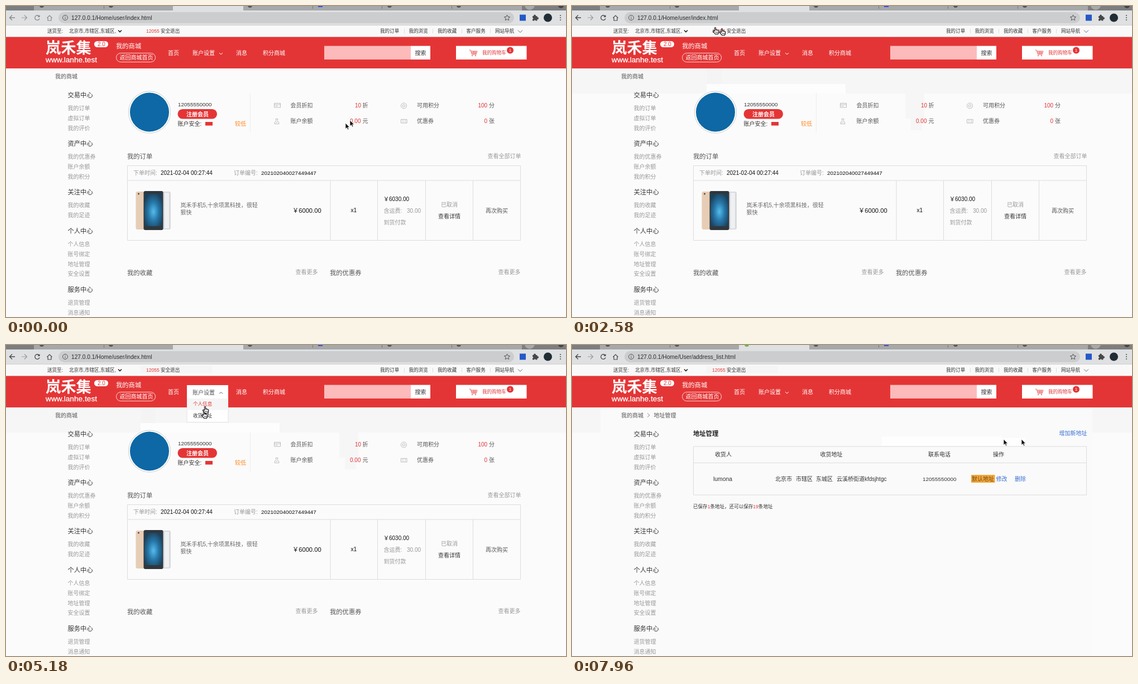
An HTML page that plays this animation: 1003 px wide and 558 px high, repeating every 8000 ms.

```html
<!DOCTYPE html>
<html lang="zh-CN">
<head>
<meta charset="utf-8">
<style>
html, body { margin: 0; width: 100%; height: 100%; overflow: hidden; background: #fbfbfb; }
svg { display: block; width: 1003px; height: 558px; font-family: "Liberation Sans", "Noto Sans CJK SC", "Noto Sans CJK", sans-serif; }
text { white-space: pre; }
</style>
</head>
<body>
<svg id="stage" viewBox="0 0 1003 558"></svg>
<script>
const LOOP = 8000, PAGE_CHANGE = 6850;
const RED = '#e43536', DARK = '#333', GREY = '#999', LINE = '#dcdcdc', BLUE = '#3b6fd4';

// Drawing helpers; text is placed by its left edge and vertical centre.
const text = (x, y, str, size = 10, fill = DARK, extra = '') =>
  `<text x="${x}" y="${y + size * .37}" font-size="${size}" fill="${fill}" ${extra}>${str}</text>`;
const rect = (x, y, w, h, fill, extra = '') =>
  `<rect x="${x}" y="${y}" width="${w}" height="${h}" fill="${fill}" ${extra}/>`;
const circle = (x, y, r, fill, extra = '') => `<circle cx="${x}" cy="${y}" r="${r}" fill="${fill}" ${extra}/>`;
const stroke = (d, color, width = 1, extra = '') =>
  `<path d="${d}" fill="none" stroke="${color}" stroke-width="${width}" ${extra}/>`;
const chevron = (x, y, color, up = 1, width = 1) =>
  stroke(`M${x - 3} ${y - 1.5 * up}l3 ${3 * up}l3 ${-3 * up}`, color, width);
const during = (from, to, content) => `<g data-from="${from}" data-to="${to}">${content}</g>`;
const BOLD = 'font-weight="700"';

function browser() {
  const tabs = rect(0, 0, 1003, 9, '#a7a8a9') + rect(0, 0, 50, 8, '#7d7e7f') + rect(299, 0, 126, 9, '#dfe0e1') +
    rect(924, 0, 79, 8, '#7d7e7f') +
    [64, 188, 437, 687, 811].map(x => circle(x, -1, 4, '#555')).join('') +
    [175, 549, 673, 798].map(x => rect(x, 0, 1, 5, '#777')).join('') +
    rect(559, -4, 8, 6, '#3c50d8') + circle(938, -2, 9, '#a7a8a9') + circle(994, -1, 5, '#444') +
    during(6430, PAGE_CHANGE, stroke('M311 0a4 4 0 0 0 6 1', '#777', 1.3)) +
    during(7170, LOOP, circle(313, -1, 4, '#64b947'));
  const reload = c => stroke('M59.5 18.5a4.3 4.3 0 1 0 .6 4', c, 1.3) + `<path d="M60.5 16v4h-4z" fill="${c}"/>`;
  const nav = c => stroke('M16 21H7m4-4.5L6.5 21l4.5 4.5', c, 1.3) +
    stroke('M73.5 21.5L78 17l4.5 4.5M75 21v5h6v-5', c, 1.2);
  const bar = rect(0, 8, 1003, 26, '#dfe0e1') + rect(0, 34, 1003, 1, '#d0d0d0') +
    rect(94, 11, 816, 20, '#cbcdce', 'rx="10"') +
    stroke('M28 21h9m-4-4.5l4.5 4.5l-4.5 4.5', '#999', 1.2) +
    during(0, 1280, nav('#85878a') + reload('#85878a')) +
    during(1280, LOOP, nav('#454749')) +
    during(1280, 5950, reload('#454749')) + during(PAGE_CHANGE, LOOP, reload('#454749')) +
    during(5950, PAGE_CHANGE, stroke('M52 17l8 8m0-8l-8 8', '#454749', 1.4)) +
    circle(106, 21, 4.5, 'none', 'stroke="#555"') + rect(105.5, 20.5, 1, 3, '#555') + rect(105.5, 18.3, 1, 1, '#555') +
    during(0, 5950, text(117, 21, '127.0.0.1/Home/user/index.html', 10.2, '#2c2c2c')) +
    during(5950, LOOP, text(117, 21, '127.0.0.1/Home/User/address_list.html', 10.2, '#2c2c2c')) +
    stroke('M897.5 16l1.5 3.3l3.6 .4l-2.7 2.4l.8 3.6l-3.2 -1.9l-3.2 1.9l.8 -3.6l-2.7 -2.4l3.6 -.4z', '#555') +
    rect(920, 15.5, 11, 11, '#2459c8') +
    rect(943, 18, 8.5, 8.5, '#454749', 'rx="1"') + circle(947, 17.5, 2, '#454749') + circle(952, 22, 2, '#454749') +
    circle(943, 22.3, 1.3, '#dfe0e1') + circle(947.3, 26.5, 1.3, '#dfe0e1') +
    circle(970.5, 21, 7.5, '#202d35') +
    [17, 21, 25].map(y => circle(993, y, 1.1, '#555')).join('');
  return tabs + bar;
}

function topBar() {
  const links = ['我的订单', '我的浏览', '我的收藏', '客户服务', '网站导航'];
  const place = text(113, 45, '北京市,市辖区,东城区,', 8.55) + chevron(204, 45, '#222', 1, 1.6);
  return rect(0, 35, 1003, 21, '#f9f9f9') +
    during(4250, LOOP, rect(241, 37, 128, 14, '#f6f5f5')) +
    text(74, 45, '送货至:', 8.55) +
    during(0, PAGE_CHANGE, place) + during(7010, LOOP, place) +
    during(PAGE_CHANGE, 7010, chevron(121, 45, '#222', 1, 1.6)) +
    text(251, 45, '12055', 8.55, RED) + text(277, 45, '安全退出', 8.55) +
    links.map((label, i) => text(670 + 51.5 * i, 45, label, 8.55)).join('') +
    [713, 764, 816, 867].map(x => rect(x, 41, 1, 8, LINE)).join('') +
    stroke('M917 43.5l4 4l4 -4', '#666');
}

function header() {
  const cart = stroke('M829.5 79h2.5l2.5 8h7.5l2 -6h-11.5m.5 2h10m-9 2h8.500M837 81v6m3-6v6', RED, .7) +
    circle(835, 89.2, .9, RED) + circle(841, 89.2, .9, RED);
  return rect(0, 55.5, 1003, 56.5, RED) +
    text(71, 75, '岚禾集', 27.3, '#fff', BOLD) +
    rect(158, 63, 25, 11, '#fff', 'rx="5.5"') + text(164, 68.5, '2.0', 10, RED) +
    text(71, 96, 'www.lanhe.test', 13.7, '#fff', 'stroke="#fff" stroke-width=".3"') +
    text(197, 72, '我的商城', 11.3, '#fff') +
    rect(197.5, 84.5, 70, 16, 'none', 'rx="8" stroke="#fff" stroke-width=".8"') + text(203.5, 92, '返回商城首页', 10, '#fff') +
    [[290, '首页'], [334, '账户设置'], [412, '消息'], [460, '积分商城']]
      .map(([x, label]) => text(x, 84.5, label, 10, '#fff', 'font-weight="500"')).join('') +
    chevron(385, 85.5, '#fff') +
    rect(570, 71.6, 155, 24.4, '#fcbabb') + rect(725, 71.6, 35, 24.4, '#fff') + text(732.5, 84, '搜索', 10) +
    rect(806, 71.6, 126.5, 24.4, '#fff') + cart + text(853, 84, '我的购物车', 8.55, RED) +
    circle(903, 79.5, 6, RED) + text(900.8, 79.5, '1', 8, '#fff');
}

function sidebar() {
  const groups = [
    [160, '交易中心', '我的订单 虚拟订单 我的评价'],
    [247, '资产中心', '我的优惠券 账户余额 我的积分'],
    [334, '关注中心', '我的收藏 我的足迹'],
    [404, '个人中心', '个人信息 账号绑定 地址管理 安全设置'],
    [509, '服务中心', '退货管理 消息通知']];
  return text(88, 126, '我的商城', 10, '#555') + groups.map(([y, title, items]) =>
    text(110.5, y, title, 11.3) +
    items.split(' ').map((label, i) => text(110.5, y + 23.6 + 17.6 * i, label, 10, GREY)).join('')).join('');
}

// Faint repaint areas the pointer leaves behind on the page.
function residue() {
  return during(1280, LOOP, rect(0, 112, 51, 45, '#f6f6f6') + rect(932, 112, 71, 45, '#f6f6f6')) +
    during(1280, PAGE_CHANGE, rect(51, 112, 881, 45, '#f6f6f6')) +
    during(150, PAGE_CHANGE, rect(607, 202, 20, 21, '#f6f6f6')) +
    during(800, PAGE_CHANGE, rect(597, 157, 34, 45, '#f6f6f6')) +
    during(1440, PAGE_CHANGE, rect(253, 140, 237, 17, '#fdfdfd')) +
    during(1930, PAGE_CHANGE, rect(241, 140, 12, 17, '#fdfdfd') + rect(242, 112, 26, 28, '#f4f4f4')) +
    during(1600, 1930, rect(249, 112, 19, 27, '#f4f4f4')) +
    during(PAGE_CHANGE, LOOP, rect(51, 112, 881, 446, '#fafafa')) +
    during(7490, LOOP, rect(555, 164, 215, 17, '#fefefe')) +
    during(7960, LOOP, rect(770, 167, 42, 15, '#fefefe'));
}

function phones() {
  return `<defs><radialGradient id="screen" cy=".55" r=".6"><stop stop-color="#55bdea"/><stop offset=".5" stop-color="#2676a8"/>
    <stop offset="1" stop-color="#1d4058"/></radialGradient></defs>` +
    rect(232.5, 333, 22, 68, '#e7cdb5', 'rx="3"') + circle(237.5, 337, 1.5, '#544') +
    rect(276, 333, 19, 68, '#d9dadd', 'rx="3"') + rect(284, 335, 8, 64, '#eff0f1') +
    rect(246.5, 332, 35, 70, '#30373d', 'rx="3"') + rect(248, 337, 32, 58, 'url(#screen)');
}

function homePage() {
  const stat = (x, y, label, valueX, value, unitX, unit) =>
    text(x, y, label, 10, '#555') + text(valueX, y, value, 10, RED) + text(unitX, y, unit, 10, '#555');
  const profile = circle(257, 190.5, 37.5, '#fff', 'stroke="#ccc"') + circle(257, 190.5, 35, '#0d68a5') +
    text(308, 176, '12055550000', 9.9) +
    rect(307.5, 185, 70.5, 17.5, RED, 'rx="8.7"') + text(323, 194, '注册会员', 10, '#fff', BOLD) +
    text(307.5, 211, '账户安全:') + rect(357, 208, 13, 6.5, RED) + text(410, 211, '较低', 10, '#ff8a23') +
    rect(437, 156, 1, 71, '#eee');
  const icons = stroke('M480.5 174.5h11v7.5h-11zM480.5 177h11m-9 2.5h4', '#bbb') +
    stroke('M483 202.5h4l-1 3q3 2 3 6h-8q0 -4 3 -6zM483.5 208.5h3', '#bbb') +
    circle(712.5, 179, 5, 'none', 'stroke="#bbb"') + circle(712.5, 179, 2.2, 'none', 'stroke="#bbb"') +
    stroke('M707.5 203.5h10.5v6.5h-10.5zM710 205.5h2m-2 2.5h2m2 -2.5h2m-2 2.5h2', '#bbb');
  const stats = stat(509.5, 178, '会员折扣', 625, '10', 638.5, '折') + stat(509.5, 206, '账户余额', 616, '0.00', 638.5, '元') +
    stat(736, 178, '可用积分', 845.5, '100', 865, '分') + stat(736, 206, '优惠券', 856.5, '0', 865, '张');
  const order = text(217, 270, '我的订单', 11.3, '#555') + text(862.5, 269, '查看全部订单', 10, GREY) +
    stroke('M217.5 286.5h704v134h-704zM217.5 313h704M581 313v107M665.5 313v107M751.5 313v107M836.5 313v107', LINE) +
    text(228, 299, '下单时间:', 10, GREY) + text(277, 299, '2021-02-04 00:27:44', 10, '#111') +
    text(408, 299, '订单编号:', 10, GREY) + text(457, 299, '202102040027449447', 9.9, '#111') +
    phones() + text(312.5, 357, '岚禾手机5,十余项黑科技，很轻', 10, '#666') + text(312.5, 370, '狠快', 10, '#666') +
    text(513, 367, '￥6000.00', 11.2, '#111') + text(617.5, 366.5, 'x1', 10, '#111') +
    text(676, 346, '￥6030.00', 10, '#111') + text(676.5, 367, '含运费:', 10, GREY) + text(718, 367, '30.00', 10, GREY) +
    text(676.5, 388, '到货付款', 10, GREY) + text(779, 356, '已取消', 10, GREY) +
    text(774, 377.5, '查看详情') + text(859, 367, '再次购买', 10, '#555');
  const more = text(217, 479, '我的收藏', 11.3, '#555') + text(518.5, 477.5, '查看更多', 10, GREY) +
    text(580, 479, '我的优惠券', 11.3, '#555') + text(881.5, 477.5, '查看更多', 10, GREY);
  return profile + icons + stats + order + more;
}

function addressPage() {
  const labels = [[256, '收货人'], [444.5, '收货地址'], [638, '联系电话'], [754, '操作']];
  const address = [[364, '北京市'], [401, '市辖区'], [437, '东城区'], [474, '云溪桥街道kfdsjhtgc']];
  const red = n => `<tspan fill="${RED}">${n}</tspan>`;
  return stroke('M135 122.5l4 3.5l-4 3.5', '#888') + text(146.5, 126, '地址管理', 10, '#555') +
    text(217, 159, '地址管理', 11.3, '#222', BOLD) + text(872.5, 158, '增加新地址', 10, BLUE) +
    stroke('M217.5 182h704v87h-704zM217.5 211.5h704', LINE) +
    labels.map(([x, label]) => text(x, 196.5, label)).join('') +
    text(253, 240, 'lumona', 10.4) + address.map(([x, part]) => text(x, 240, part)).join('') +
    text(628, 240, '12055550000', 9.9) +
    rect(715, 233, 42.5, 14, '#f6a536') + text(716, 240, '默认地址', 10, '#665021') +
    text(759.5, 240, '修改', 10, BLUE) + text(793, 240, '删除', 10, BLUE) +
    text(217, 290, `已保存${red(1)}条地址，还可以保存${red(19)}条地址`, 8.55);
}

function accountMenu() {
  const item = (y, label, from, to) =>
    text(335, y, label, 8.55) + during(from, to, rect(324.5, y - 10, 73, 20.5, '#f5f5f5') + text(335, y, label, 8.55, RED));
  return rect(324, 72, 74, 66.5, '#fff') + stroke('M324 112v26.5h74V112', '#ddd', .8) +
    text(334, 85, '账户设置', 10, '#555') + chevron(385, 86, '#555', -1) +
    item(106, '个人信息', 5000, 5320) + item(127, '收货地址', 5320, PAGE_CHANGE);
}

const SHAPES = {
  arrow: '<path d="M0 0V10.5L2.5 8.3L4.2 12L5.9 11.2L4.3 7.7H7.5Z" fill="#111" stroke="#fff" stroke-width=".7"/>',
  hand: `<path d="M3.5 7V1.7Q3.5 .5 4.5 .5T5.6 1.7V5Q7 4 7.6 5.3Q8.9 4.5 9.3 5.8Q10.7 5.3 10.8 7
    Q11 9.5 9.5 12.5H4.5Q3 10 .7 8Q.3 6.500 1.7 6.3Q2.7 6.3 3.5 7Z" fill="#fff" stroke="#111" stroke-width="1.2"/>
    <path d="M5.5 8v2.500M7.2 8v2.500M8.900 8v2.500" stroke="#111" stroke-width=".7"/>`
};

// Pointer stops: shape, then [time, x, y] of its top left corner.
const STOPS = [
  ['arrow', [-150, 608, 210], [0, 616, 205], [150, 621, 198], [310, 620, 181], [480, 612, 165], [640, 604, 150],
    [800, 600, 142], [960, 598, 138], [1130, 597, 137], [1280, 490, 141], [1440, 262, 140], [1600, 252, 139],
    [1780, 250, 80], [1930, 249, 62], [2090, 249, 52], [2250, 250, 47]],
  ['hand', [2400, 252, 38], [2560, 264, 40], [2720, 274, 43], [2880, 268, 47], [3040, 258, 46], [3200, 250, 44],
    [3350, 246, 43], [3500, 249, 46], [3650, 286, 66], [3800, 332, 78], [3950, 350, 82], [4100, 353, 84],
    [4250, 353, 84], [4850, 353, 90], [5000, 352, 110], [5180, 350, 119], [5320, 351, 126], [5470, 351, 126]],
  ['arrow', [7010, 357, 128], [7170, 420, 150], [7330, 555, 165], [7490, 762, 169], [7660, 773, 169], [7960, 805, 169]]
].flatMap(([shape, ...points]) => points.map(p => [shape, ...p]));

const stage = document.getElementById('stage');
stage.innerHTML = rect(0, 0, 1003, 558, '#fbfbfb') + residue() + browser() + topBar() + header() + sidebar() +
  during(0, PAGE_CHANGE, homePage()) + during(PAGE_CHANGE, LOOP, addressPage()) +
  during(3950, PAGE_CHANGE, accountMenu()) + '<g id="pointer"></g>';
const timed = [...stage.querySelectorAll('[data-from]')];
const pointer = document.getElementById('pointer');

function render(time) {
  for (const el of timed) {
    const visible = time >= +el.dataset.from && time < +el.dataset.to;
    el.style.display = visible ? '' : 'none';
  }
  // The previous stop stays visible beside the current one until the next move.
  const current = STOPS.findLastIndex(stop => stop[1] <= time);
  pointer.innerHTML = STOPS.slice(current - 1, current + 1)
    .map(([shape, , x, y]) => `<g transform="translate(${x} ${y})">${SHAPES[shape]}</g>`).join('');
}

const start = performance.now();
function tick() {
  render((performance.now() - start) % LOOP);
  requestAnimationFrame(tick);
}
tick();
</script>
</body>
</html>
```
